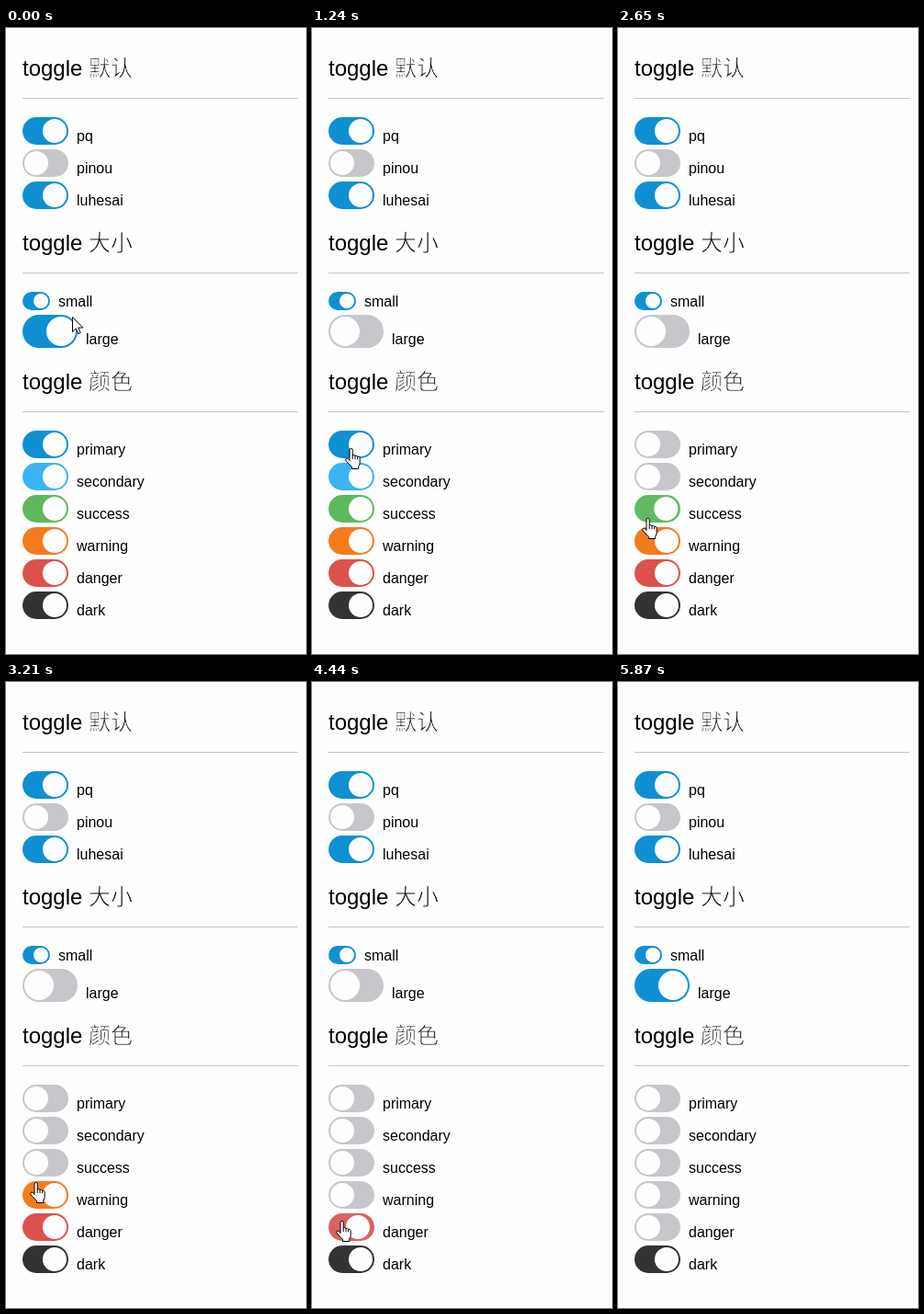
Animation, 327 px wide and 681 px high, one loop 7.85 s. Source, as an HTML page with a canvas:

```html
<!DOCTYPE html>
<html lang="zh">
<head>
<meta charset="utf-8">
<title>toggle</title>
<style>
html, body { margin: 0; width: 100%; height: 100%; overflow: hidden; background: #fefefe; }
canvas { display: block; width: 327px; height: 681px; }
</style>
</head>
<body>
<canvas id="stage"></canvas>
<script>
const W = 327, H = 681, LEFT = 18;
const LOOP = 7850, FADE = 300, TRAVEL = 300, TICK = 132;
const PAPER = '#fefefe', OFF = [199, 199, 203], BLUE = [14, 144, 210];
const LATIN = '"Liberation Sans", Arial, sans-serif';
const HAN = '"Noto Sans CJK SC", "Noto Sans CJK", sans-serif';

const canvas = document.getElementById('stage');
const ctx = canvas.getContext('2d');
const dpr = window.devicePixelRatio || 1;
canvas.width = W * dpr;
canvas.height = H * dpr;

const toggle = (label, more) =>
  ({ label, color: BLUE, w: 50, h: 30, on: true, clicks: [], ...more });

const groups = [
  { title: '默认', items: [
    toggle('pq'),
    toggle('pinou', { on: false }),
    toggle('luhesai')
  ] },
  { title: '大小', items: [
    toggle('small', { w: 30, h: 20 }),
    toggle('large', { w: 60, h: 36, clicks: [690, 5230] })
  ] },
  { title: '颜色', items: [
    toggle('primary', { clicks: [1565] }),
    toggle('secondary', { color: [59, 180, 242], clicks: [2185] }),
    toggle('success', { color: [94, 185, 94], clicks: [2600] }),
    toggle('warning', { color: [245, 124, 28], clicks: [3736] }),
    toggle('danger', { color: [221, 81, 76], clicks: [4400] }),
    toggle('dark', { color: [51, 51, 51] })
  ] }
];

// Screen updates every TICK, counted from each of these times
const bursts = [0, 150, 710, 1790, 2220, 3340, 4440, 5260];

// Pointer stops: arrival time, x, y
const stops = [
  [0, 72, 314], [420, 31, 329], [1106, 44, 615], [1238, 36, 457],
  [1790, 31, 495], [2616, 26, 533], [3190, 26, 546], [3472, 26, 496],
  [3736, 26, 557], [4180, 26, 586], [4968, 58, 326], [5780, 240, 700]
];

const arrow = new Path2D('M.5 .5V16.5L4.2 13L6.8 18.7L9.2 17.6L6.7 12H11.8Z');
const hand = new Path2D('M5 13.5V2a1.6 1.6 0 0 1 3.2 0V8q1.4-1.2 2.8.6q1.6-.9 2.6.7' +
  'q2-.6 2.6 1.4V16q0 2-1.4 3.6V22.5H7.5V20.5L1.2 14q-1.2-2 .5-3q1.6-.4 3.3 2.5Z');
const fingers = new Path2D('M8.2 8v4M11 8.6v3.6M13.6 9.3v3');

const mix = (a, b, p) => a + (b - a) * p;
const clamp = p => Math.min(1, Math.max(0, p));
const bezier = (a, b, u) => 3 * a * u * (1 - u) ** 2 + 3 * b * u * u * (1 - u) + u ** 3;

// CSS "ease"
function ease(x) {
  let lo = 0, hi = 1;
  for (let i = 0; i < 20; i++) {
    const mid = (lo + hi) / 2;
    if (bezier(.25, .25, mid) < x) lo = mid; else hi = mid;
  }
  return bezier(.1, 1, lo);
}

function snap(t) {
  const from = bursts.findLast(b => b <= t);
  return from + Math.floor((t - from) / TICK) * TICK;
}

// 1 when on, 0 when off; every click flips it
function level({ on, clicks }, t) {
  return clicks.reduce((value, at, i) =>
    mix(value, on === (i % 2 > 0) ? 1 : 0, ease(clamp((t - at) / FADE))), on ? 1 : 0);
}

function text(str, x, y, font) {
  ctx.font = font;
  ctx.fillText(str, x, y);
}

function drawTitle(word, line) {
  ctx.fillStyle = '#000';
  text('toggle', LEFT, line - 24, '24px ' + LATIN);
  text(word, 90, line - 24, '24px ' + HAN);
  // Thin the strokes of the heavier face
  ctx.strokeStyle = PAPER;
  ctx.lineWidth = .8;
  ctx.strokeText(word, 90, line - 24);
  ctx.fillStyle = '#c6c6c6';
  ctx.fillRect(LEFT, line, 300, 1);
}

function drawToggle(item, y, t) {
  const { label, color, w, h } = item;
  const p = level(item, t), r = h / 2;
  ctx.fillStyle = `rgb(${OFF.map((c, i) => Math.round(mix(c, color[i], p)))})`;
  ctx.beginPath();
  ctx.roundRect(LEFT, y, w, h, r);
  ctx.fill();
  ctx.fillStyle = PAPER;
  ctx.beginPath();
  ctx.arc(LEFT + mix(r, w - r, p), y + r, r - 2, 0, Math.PI * 2);
  ctx.fill();
  ctx.fillStyle = '#000';
  text(label, LEFT + w + 9, y + h - 4, '16px ' + LATIN);
}

function drawPage(t) {
  let bottom = 7;
  for (const { title, items } of groups) {
    drawTitle(title, bottom + 69);
    let y = bottom + 90;
    for (const item of items) {
      drawToggle(item, y, t);
      bottom = y + item.h;
      y = bottom + 5;
    }
  }
}

// Rests at each stop, then leaves just in time for the next
function pointerAt(t) {
  const i = stops.findIndex(s => s[0] > t);
  if (i < 0) return stops.at(-1).slice(1);
  const [t0, x0, y0] = stops[i - 1], [t1, x1, y1] = stops[i];
  const p = clamp(1 - (t1 - t) / Math.min(TRAVEL, t1 - t0));
  return [mix(x0, x1, p), mix(y0, y1, p)].map(Math.round);
}

function drawPointer(t) {
  const [x, y] = pointerAt(t);
  const overToggle = x < 70;
  const shape = overToggle ? hand : arrow;
  ctx.save();
  ctx.translate(x, y);
  ctx.fillStyle = '#fff';
  ctx.strokeStyle = '#000';
  ctx.lineWidth = 1;
  ctx.lineJoin = 'round';
  ctx.fill(shape);
  ctx.stroke(shape);
  if (overToggle) ctx.stroke(fingers);
  ctx.restore();
}

function draw(t) {
  ctx.setTransform(dpr, 0, 0, dpr, 0, 0);
  ctx.fillStyle = PAPER;
  ctx.fillRect(0, 0, W, H);
  drawPage(t);
  drawPointer(t);
}

const start = performance.now();
function tick() {
  draw(snap((performance.now() - start) % LOOP));
  requestAnimationFrame(tick);
}
tick();
</script>
</body>
</html>
```
